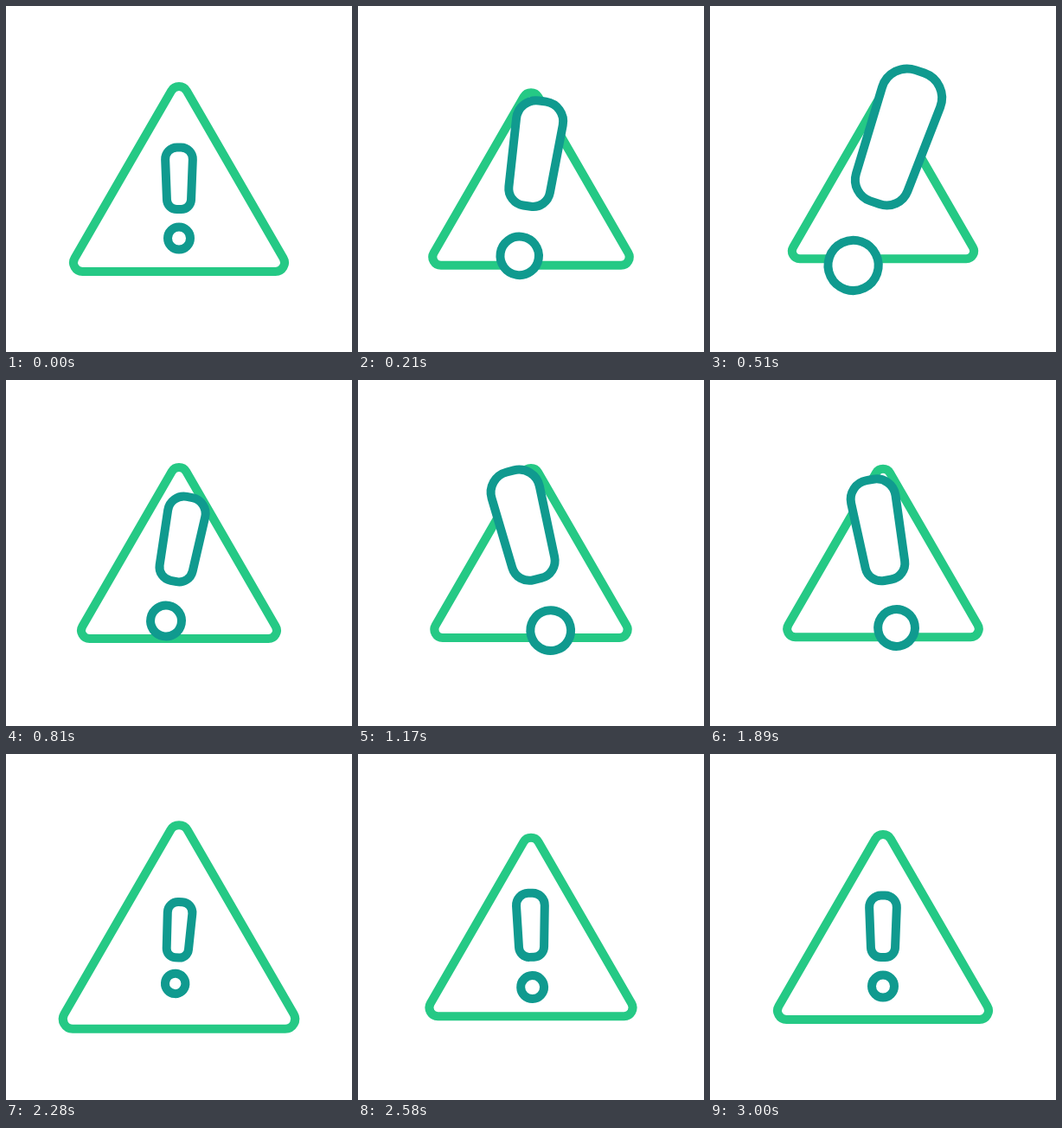
Animation, 400 px wide and 400 px high, one loop 5030 ms. Source, as an HTML page with a canvas:

```html
<!DOCTYPE html>
<html lang="en">
<head>
<meta charset="utf-8">
<title>Warning sign</title>
<style>
  html, body { margin: 0; width: 100%; height: 100%; overflow: hidden; background: #fff; }
  canvas { display: block; width: 400px; height: 400px; }
</style>
</head>
<body>
<canvas id="stage" width="400" height="400"></canvas>
<script>
const ctx = document.getElementById('stage').getContext('2d');
const LOOP = 5030, STEP = 30, MOVE_END = 3000, REBOUND = 2210;
const GREEN = '#25c985', TEAL = '#109a8f';

const mix = (a, b, k) => a + (b - a) * k;

// Eased 0 to 1 between two times.
function ramp(t, from, to) {
  const k = Math.min(Math.max((t - from) / (to - from), 0), 1);
  return (1 - Math.cos(Math.PI * k)) / 2;
}

// Stays at 1 until the rebound, then rings out to 0.
function settle(t) {
  const fade = 1 - ramp(t, REBOUND, MOVE_END);
  return fade ** 2 * Math.cos(Math.PI * Math.max(t - REBOUND, 0) / 400);
}

function signScale(t) {
  const shrink = 1 - 0.14 * ramp(t, 0, 430);
  const swell = 0.083 * (ramp(t, 460, 960) - ramp(t, 960, 1500));
  return mix(shrink + swell, 1 + 0.123 * settle(t), ramp(t, 1765, REBOUND));
}

function markScale(t) {
  const grow = 1 + 1.32 * ramp(t, 0, 400);
  const dip = 1.08 * (ramp(t, 420, 930) - ramp(t, 930, 1400));
  return mix(grow - dip, 1 - 0.12 * settle(t), ramp(t, 1595, REBOUND));
}

function markAngle(t) {
  const swing = 19 * ramp(t, 0, 450) - 38 * ramp(t, 570, 1350);
  return mix(swing, 4.6 * settle(t), ramp(t, 1660, REBOUND)) * Math.PI / 180;
}

// Corners are [x, y, radius]; scaling leaves the line weight alone.
function roundedPath(corners, scale, pivot = 0) {
  const pts = corners.map(([x, y, r]) => [x * scale, mix(pivot, y, scale), r * scale]);
  const last = pts[pts.length - 1];
  ctx.beginPath();
  ctx.moveTo((last[0] + pts[0][0]) / 2, (last[1] + pts[0][1]) / 2);
  pts.forEach(([x, y, r], i) => {
    const next = pts[(i + 1) % pts.length];
    ctx.arcTo(x, y, next[0], next[1], r);
  });
  ctx.closePath();
}

function paint(color) {
  ctx.strokeStyle = color;
  ctx.fill();
  ctx.stroke();
}

function drawSign(scale) {
  const half = 129.5, base = 107, top = base - half * Math.sqrt(3), r = 10.3;
  roundedPath([[0, top, r], [half, base, r], [-half, base, r]], scale);
  paint(GREEN);
}

function drawMark(scale, angle) {
  ctx.rotate(angle);
  const top = -36.5, wide = 16.4, base = 35, narrow = 13.6;
  roundedPath([[-wide, top, 13.5], [wide, top, 13.5],
    [narrow, base, 11.5], [-narrow, base, 11.5]], scale, 40);
  paint(TEAL);
  ctx.beginPath();
  ctx.arc(0, mix(38.5, 68.5, scale), 13 * scale, 0, Math.PI * 2);
  paint(TEAL);
}

function draw(t) {
  ctx.setTransform(1, 0, 0, 1, 0, 0);
  ctx.fillStyle = '#fff';
  ctx.fillRect(0, 0, 400, 400);
  ctx.translate(200, 200);
  ctx.lineWidth = 10;
  drawSign(signScale(t));
  drawMark(markScale(t), markAngle(t));
}

const start = performance.now();
function tick() {
  const t = (performance.now() - start) % LOOP;
  draw(Math.min(Math.floor(t / STEP) * STEP, MOVE_END));
  requestAnimationFrame(tick);
}
tick();
</script>
</body>
</html>
```
